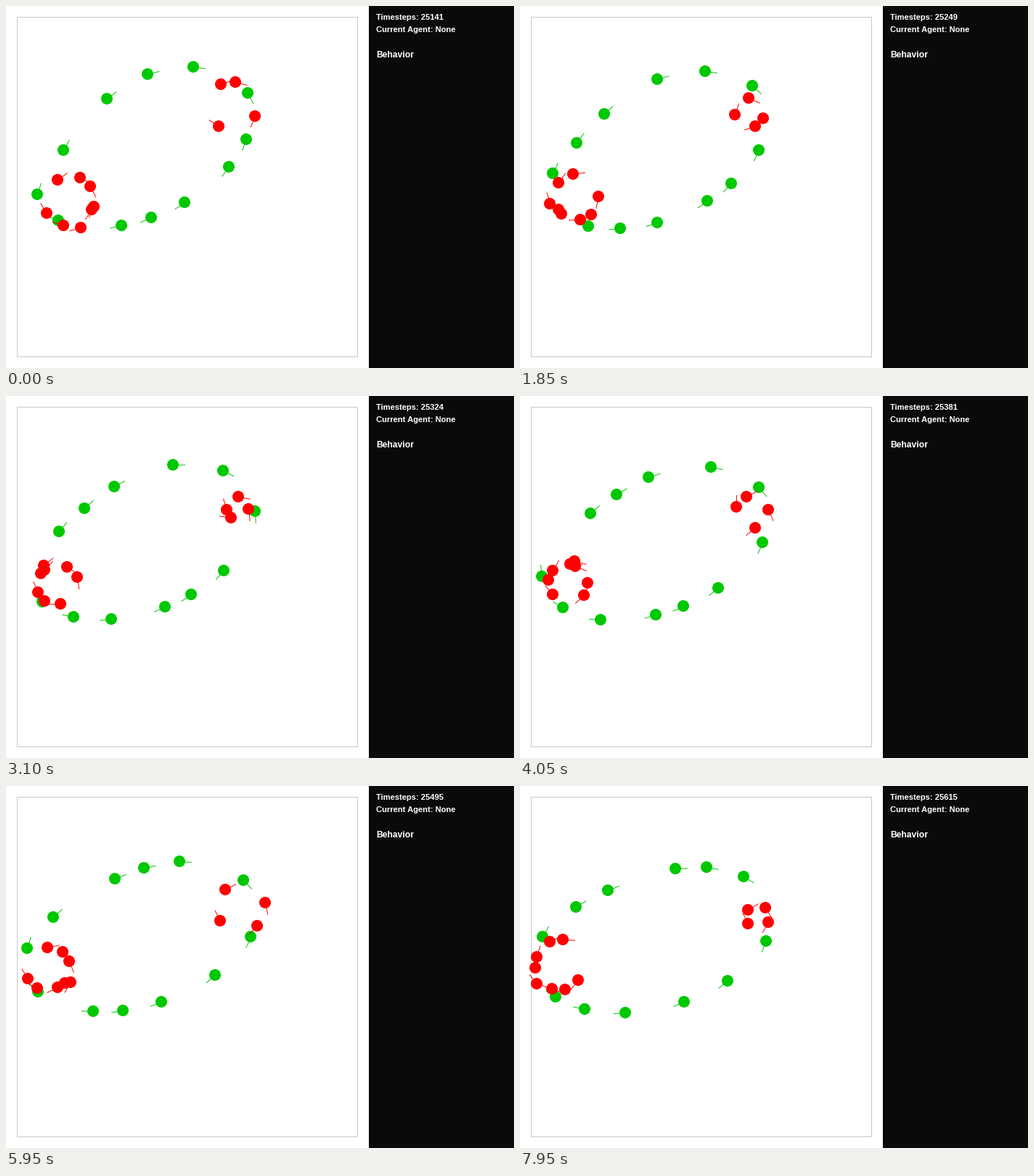
These frames come from a looping animation (700x500 px, 8000 ms). A matplotlib script:

```python
import numpy as np
import matplotlib.pyplot as plt
from matplotlib.animation import FuncAnimation
from matplotlib.patches import Circle, Rectangle

W, H, DPI = 700, 500, 100
PX = 72 / DPI
FRAMES, INTERVAL = 160, 50
RADIUS, NOSE = 8, 16
RED, GREEN = "#ff0000", "#00c800"
CRUISE = 1.72  # pixels per tick

TICKS = np.arange(FRAMES - 1)
PROGRESS = TICKS / TICKS[-1]

fig = plt.figure(figsize=(W / DPI, H / DPI), dpi=DPI, facecolor="white")
ax = fig.add_axes([0, 0, 1, 1])
ax.set_xlim(0, W)
ax.set_ylim(H, 0)
ax.axis("off")


def box(x, y, w, h, color):
    ax.add_patch(Rectangle((x, y), w, h, fc=color, lw=0, aa=False))


box(15, 15, 470, 470, "#c8c8c8")
box(16, 16, 468, 468, "white")
box(500, 0, 200, H, "#0a0a0a")


def label(y, text, px):
    return ax.text(510, y, text, color="white", fontsize=px * PX, va="baseline",
                   family="Liberation Sans", weight="bold")


counter = label(19, "", 11.1)
label(36, "Current Agent: None", 11.1)
label(71, "Behavior", 12.1)


def ring(t, u):
    """Tilted ellipse that drifts and widens as u goes from 0 to 1."""
    lag = np.radians(25 - 8 * u)
    dent_at = np.radians(155 - 37 * u)
    dent = (12 + 32 * (1 - u) ** 2) * np.maximum(0, np.cos(t + dent_at)) ** 4
    x = 190 - 6 * u + (150 + 14 * u) * np.cos(t)
    y = 195 + 16 * u + (111 - 9 * u) * np.sin(t - lag) + dent
    return x + 1j * y


def ring_paths(start_degrees):
    """Agents follow the ring at cruising speed, a little faster at its tips."""
    t, eps = np.radians(start_degrees), 1e-4
    path = []
    for u in PROGRESS:
        here = ring(t, u)
        path.append(here)
        stretch = abs(ring(t + eps, u) - here) / eps
        t = t + (CRUISE + 0.4 * np.cos(t) ** 4) / stretch
    return np.array(path).T


def mill_paths(center, swell, period, starts, radii):
    """Agents circle a moving center; the whole mill breathes in and out."""
    breath = 1 + swell * np.cos(2 * np.pi * TICKS / period)
    return [center + r * breath * np.exp(1j * (np.radians(s) + TICKS * CRUISE / r))
            for s, r in zip(starts, radii)]


class Agent:
    def __init__(self, color, path):
        self.path = path
        step = np.gradient(path)
        self.nose = NOSE * step / abs(step)
        self.line, = ax.plot([], [], color=color, lw=PX, zorder=3)
        self.body = ax.add_patch(Circle((0, 0), RADIUS, fc=color, lw=0, zorder=3))

    def show(self, tick):
        p, n = self.path[tick], self.nose[tick]
        x, y = round(p.real), round(p.imag)
        self.body.center = x, y
        self.line.set_data([x + .5, x + .5 + n.real], [y + .5, y + .5 + n.imag])


orbit = ring_paths([-110, -88, -63, -17.5, 19.5, 39, 68, 86, 102, 142, 192, 222])

right_center = 313 + 14 * PROGRESS + 1j * (138 + 42 * PROGRESS)
right = mill_paths(right_center, 0.39, 112,
                   starts=[240, 276, 25, 125],
                   radii=[25, 23.7, 24, 25])

left_center = 54 + 34 * (1 - PROGRESS) ** 1.5 + 1j * (269 - 22 * PROGRESS)
left = mill_paths(left_center, 0.12, 160,
                  starts=[240, 294, 325, 14, 22, 68, 105, 152],
                  radii=[30, 31, 31, 30, 29, 36, 31, 32])

agents = [Agent(GREEN, p) for p in orbit] + [Agent(RED, p) for p in right + left]


def draw(frame):
    tick = max(frame - 1, 0)  # the opening pose is held for two frames
    counter.set_text(f"Timesteps: {25141 + 3 * tick}")
    for agent in agents:
        agent.show(tick)
    return []


anim = FuncAnimation(fig, draw, frames=FRAMES, interval=INTERVAL, repeat=True,
                     repeat_delay=0, init_func=lambda: draw(0))
plt.show()
```
